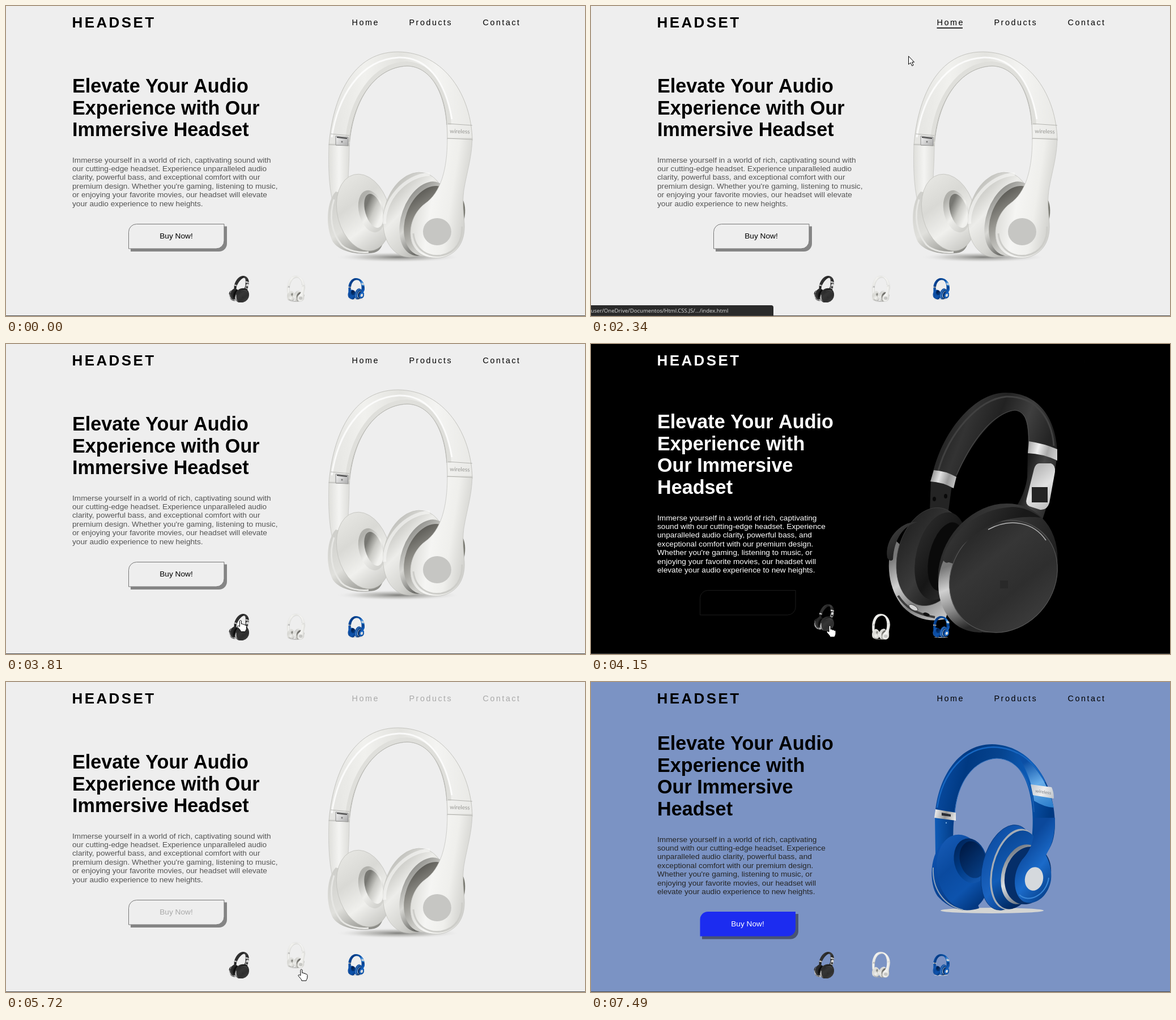
Animation of 1022 by 548 pixels, one loop 8150 ms. Source, as an HTML page with a canvas:

```html
<!DOCTYPE html>
<html lang="en">
<head>
<meta charset="utf-8">
<title>Headset</title>
<style>
html, body { margin: 0; width: 100%; height: 100%; overflow: hidden; background: #eee; }
canvas { display: block; }
</style>
</head>
<body>
<canvas id="stage" width="1022" height="548"></canvas>
<script>
const ctx = document.getElementById('stage').getContext('2d', { alpha: false });
const LOOP = 8150, SANS = '"Liberation Sans", Arial, sans-serif';
const clamp = v => Math.min(1, Math.max(0, v));
const mix = (a, b, k) => a + (b - a) * k;
const ease = k => k * k * (3 - 2 * k);
const blend = (a, b, k) => `rgb(${a.map((v, i) => Math.round(mix(v, b[i], k)))})`;

// ---------- drawing helpers ----------
function shape(d, fill, stroke, width = 1) {
  const path = new Path2D(d);
  if (fill) { ctx.fillStyle = fill; ctx.fill(path); }
  if (stroke) { ctx.strokeStyle = stroke; ctx.lineWidth = width; ctx.stroke(path); }
}
function oval(x, y, rx, ry, turn, fill, stroke, width = 1) {
  ctx.beginPath();
  ctx.ellipse(x, y, rx, ry, turn, 0, 7);
  if (fill) { ctx.fillStyle = fill; ctx.fill(); }
  if (stroke) { ctx.strokeStyle = stroke; ctx.lineWidth = width; ctx.stroke(); }
}
function shade(x0, y0, x1, y1, ...colors) {
  const g = ctx.createLinearGradient(x0, y0, x1, y1);
  colors.forEach((c, i) => g.addColorStop(i / (colors.length - 1), c));
  return g;
}
function text(str, x, y, font, color, spacing = 0, align = 'left') {
  ctx.font = font;
  ctx.letterSpacing = spacing + 'px';
  ctx.textAlign = align;
  ctx.fillStyle = color;
  ctx.fillText(str, x, y);
}
function bandLabel(x, y, turn, size, color) {
  ctx.save();
  ctx.translate(x, y);
  ctx.rotate(turn);
  text('wireless', 0, 0, size + 'px Lato, sans-serif', color, 0, 'center');
  ctx.restore();
}
function floorShadow(x, y, rx, ry) {
  ctx.save();
  ctx.translate(x, y);
  ctx.scale(1, ry / rx);
  const g = ctx.createRadialGradient(0, 0, 0, 0, 0, rx);
  g.addColorStop(0, 'rgba(90,90,86,.75)');
  g.addColorStop(.6, 'rgba(170,170,166,.45)');
  g.addColorStop(1, 'rgba(225,225,225,0)');
  oval(0, 0, rx, rx, 0, g);
  ctx.restore();
}

// ---------- headsets ----------
function whiteHeadset() {
  floorShadow(692, 444, 108, 9);
  // headband and left arm
  shape('M570 246C575 180 602 81 692 81C775 82 822 160 823 238L779 236C780 160 752 106 708 106C652 108 612 165 606 248Z',
    shade(570, 0, 823, 0, '#e4e4e1', '#f1f1ee', '#e3e3df', '#f4f4f2', '#e9e9e6'), '#c3c3be', 1);
  shape('M602 243C609 163 650 104 707 102C750 103 779 150 782 210', null, '#dfdfdb', 8);
  shape('M575 232C585 165 622 94 694 91C742 90 775 130 787 200', null, 'rgba(255,255,255,.8)', 3);
  shape('M606 240C613 165 652 108 708 106C748 107 775 150 778 210', null, '#b5b5b0', 1);
  shape('M570 244H606C606 275 604 295 604 310L577 348C569 315 569 280 570 244Z',
    shade(569, 0, 607, 0, '#dededa', '#f4f4f2', '#dcdcd8'), '#c6c6c2', .8);
  shape('M582 230L604 232V247L582 246Z', shade(582, 230, 604, 247, '#f4f4f4', '#aaa'), '#777', .8);
  shape('M584 232L602 234', null, '#444', 2);
  oval(593, 240, 1.5, 1.5, 0, '#777');
  shape('M570 245L606 247M573 226L606 229', null, '#a9a9a5', .8);
  // left cup
  shape('M582 328C566 345 563 390 577 417C590 436 625 441 650 436C672 430 670 395 660 350Z',
    shade(570, 340, 640, 440, '#cfcfcb', '#e0e0dc', '#8e8e89'));
  shape('M579 342C570 370 574 400 592 422C603 433 625 437 640 435', null, '#e6e6e3', 3);
  oval(631, 365, 46, 69, -.25, shade(590, 310, 672, 420, '#e6e6e2', '#d9d9d5', '#f0f0ed', '#c8c8c4'), '#bfbfba', .8);
  oval(645, 363, 22, 38, -.25, shade(625, 345, 668, 380, '#b0b0ab', '#efefec', '#d2d2ce'));
  oval(649, 362, 15, 31, -.28, shade(635, 355, 664, 368, '#777772', '#c9c9c4', '#f1f1ee'));
  // right cup
  oval(721, 369, 54, 76, .24, shade(670, 330, 765, 420, '#bfbfba', '#ededea', '#d6d6d2', '#aaaaa5'), '#c2c2bd', .8);
  shape('M668 385C666 345 702 300 748 297', null, 'rgba(250,250,248,.6)', 6);
  oval(740, 376, 42, 68, .34, shade(702, 340, 760, 400, '#8d8d89', '#d8d8d4', '#6f6f6b'));
  oval(748, 380, 43, 64, .34, shade(710, 335, 760, 410, '#55544f', '#96958f', '#d0d0cc'));
  // right arm flowing into the outer shell
  shape('M806 342C812 352 811 370 808 380Z', '#77776f');
  shape('M779 234C779 290 767 330 740 349C717 366 709 397 717 420C726 441 745 447 767 445C796 440 811 417 809 384C808 367 805 351 808 326C814 290 822 270 823 234Z',
    shade(718, 350, 815, 365, '#dcdcd8', '#f5f5f3', '#efefec', '#d0d0cc'), '#c4c4c0', .8);
  shape('M719 402C722 432 745 444 768 441C795 436 806 414 805 390', null, '#cdcdc9', 3);
  oval(761, 399, 25, 24, 0, '#c6c6c3');
  shape('M780 208L823 211M779 234L823 236', null, '#adada9', .9);
  bandLabel(801, 225, .03, 10, '#969692');
}

function blackHeadset() {
  // headband
  shape('M600 246C612 165 672 86 732 86C795 86 826 140 823 206L771 195C774 150 770 117 748 117C714 122 668 172 637 255Z',
    shade(620, 120, 800, 190, '#1c1c1c', '#333', '#222', '#3f3f3f', '#242424'));
  shape('M613 224C632 157 683 98 733 93C783 92 813 128 817 180', null, '#414141', 3);
  shape('M645 232C673 168 710 122 748 117C770 119 773 145 773 180', null, '#4a4a4a', 1.2);
  shape('M600 240L637 250L631 294L598 296Z', '#242424');
  oval(606, 274, 3, 4, 0, '#090909');
  oval(626, 269, 3, 4, 0, '#090909');
  shape('M605 223Q625 224 645 235L640 255Q620 244 599 243Z', shade(600, 230, 645, 245, '#8b8b8b', '#e1e1e1', '#999', '#c4c4c4'));
  // left cup
  shape('M535 345C518 385 525 435 551 465C573 488 602 492 626 486L640 440Z', shade(530, 380, 610, 488, '#777', '#d0d0d0', '#808080', '#c0c0c0'));
  shape('M542 445C555 465 572 477 607 483', null, '#3b3b3b', 4);
  oval(569, 466, 9, 4, .55, '#d5d5d5', '#444', 1);
  oval(592, 478, 6, 3, .3, '#111');
  oval(600, 376, 59, 88, .24, shade(545, 340, 655, 420, '#242424', '#3b3b3b', '#141414'), '#454545', .8);
  oval(617, 375, 43, 79, .24, shade(580, 350, 660, 400, '#262626', '#161616', '#303030'));
  oval(627, 376, 30, 62, .24, '#0a0a0a');
  shape('M523 378C517 345 548 312 576 315C551 321 535 345 533 381Q528 386 523 378Z', shade(520, 320, 560, 370, '#444', '#1b1b1b'));
  // right arm
  shape('M771 190L822 203C817 240 809 275 799 304L790 330L725 318C745 300 766 270 770 235Z',
    shade(760, 245, 816, 260, '#191919', '#444', '#292929'));
  shape('M773 172Q800 176 823 186V206Q798 194 771 193Z', shade(772, 180, 823, 195, '#aaa', '#eee', '#aaa', '#d0d0d0'));
  shape('M791 211H812Q820 214 819 226L809 281Q805 294 793 293L774 287Q766 283 769 273L782 221Q785 211 791 211Z',
    shade(775, 230, 815, 280, '#bbb', '#e2e2e2', '#c0c0c0'));
  ctx.fillStyle = '#242424';
  ctx.fillRect(778, 253, 28, 27);
  // right cup: shell, metal rim, face, fork
  oval(718, 396, 100, 119, .55, shade(622, 360, 800, 420, '#2c2c2c', '#383838', '#202020'));
  shape('M622 383C608 415 610 455 632 484C646 502 666 510 690 510L670 475L645 390Z', shade(612, 400, 655, 505, '#777', '#d0d0d0', '#888', '#292929'));
  oval(728, 411, 90, 104, .65, shade(660, 330, 790, 490, '#262626', '#363636', '#2e2e2e', '#3c3c3c'), '#555', 1.2);
  shape('M701 328C742 306 782 316 803 347', null, '#b8b8b8', 1.5);
  shape('M622 375C637 332 680 292 743 288C763 288 780 296 794 307C755 302 706 312 672 342C652 357 640 374 637 382C628 391 620 386 622 375Z',
    shade(640, 300, 730, 355, '#383838', '#191919'));
  ctx.fillStyle = '#292929';
  ctx.fillRect(722, 418, 14, 14);
}

function blueHeadset() {
  oval(708, 404, 91, 5, 0, '#d4d5d3');
  // headband
  shape('M607 240C610 175 645 110 708 110C775 111 818 175 819 250C819 275 813 294 800 306L776 290C786 240 780 135 716 135C675 137 643 178 641 245Z',
    shade(607, 150, 819, 200, '#0b4fa8', '#003982', '#06448f', '#0c5bb7', '#003982'));
  shape('M611 222C620 162 658 116 710 115C756 116 788 147 801 177', null, '#1767c2', 2.5);
  shape('M752 126C784 142 808 182 817 222Q802 222 782 210C779 180 770 158 752 126Z', shade(770, 140, 812, 218, '#0b4fa5', '#68aeea', '#2e7fcc'));
  shape('M642 236C645 175 678 137 716 135C757 136 780 180 782 230', null, '#2a6cbb', 1);
  shape('M607 238L641 241C638 262 641 275 637 288L608 305Z', shade(607, 0, 642, 0, '#0e5bb7', '#033b83'));
  shape('M608 225L644 231V245L606 240Z', shade(607, 230, 644, 242, '#eee', '#999', '#eee'));
  shape('M619 231L635 234V238L619 236Z', '#292d35');
  oval(627, 249, 1.2, 1.2, 0, '#7eb3e5');
  shape('M776 181L813 186Q817 194 817 206L780 200Z', shade(777, 185, 817, 204, '#c4cbd2', '#eee', '#bfc5cb'));
  bandLabel(798, 197, .15, 8, '#7d8288');
  // left cup
  shape('M620 285C595 310 597 365 615 382C634 402 661 408 685 400L665 330Z', shade(603, 310, 660, 400, '#0c50ac', '#063a83'));
  shape('M604 328C602 365 622 395 657 403', null, '#8da0b8', 2);
  oval(656, 336, 45, 67, -.2, shade(610, 290, 700, 390, '#1559b3', '#0a4a9f', '#0d53ad', '#003175'));
  oval(670, 316, 29, 40, -.22, shade(646, 290, 694, 335, '#00275f', '#003b86', '#1154aa'));
  oval(674, 314, 23, 33, -.22, shade(655, 295, 692, 330, '#001c49', '#063a7e'));
  // right cup
  oval(735, 328, 44, 77, .25, shade(690, 300, 778, 370, '#0d4ea4', '#1b64c1', '#003179'), '#043475', .8);
  oval(747, 331, 40, 73, .25, '#a6adb5');
  oval(750, 332, 40, 71, .25, shade(710, 290, 770, 380, '#0a4796', '#125db8', '#002962'));
  oval(761, 340, 36, 54, .28, shade(723, 310, 770, 390, '#777e87', '#dce0e3', '#596574'));
  oval(771, 342, 40, 52, .3, '#052e69');
  shape('M782 240C786 275 775 300 761 314C742 340 745 376 763 388C783 397 807 380 812 350C814 332 809 318 803 306C815 286 819 268 819 240Z',
    shade(750, 310, 816, 365, '#0b489b', '#1b6bca', '#07418c'));
  shape('M756 376C772 392 804 377 808 346', null, '#3b88d8', 2);
  oval(782, 348, 16, 21, .2, '#d5d9dd');
}

// ---------- page themes ----------
const WRAP = {
  wide: ['Elevate Your Audio|Experience with Our|Immersive Headset',
    "Immerse yourself in a world of rich, captivating sound with|our cutting-edge headset. Experience unparalleled audio|clarity, powerful bass, and exceptional comfort with our|premium design. Whether you're gaming, listening to music,|or enjoying your favorite movies, our headset will elevate|your audio experience to new heights."],
  narrow: ['Elevate Your Audio|Experience with|Our Immersive|Headset',
    "Immerse yourself in a world of rich, captivating|sound with our cutting-edge headset. Experience|unparalleled audio clarity, powerful bass, and|exceptional comfort with our premium design.|Whether you're gaming, listening to music, or|enjoying your favorite movies, our headset will|elevate your audio experience to new heights."]
};
const BLACK = [0, 0, 0], WHITE = [255, 255, 255], PALE = [238, 238, 238];
const light = { bg: '#eee', ink: BLACK, copy: '#555', wrap: 'wide', head: 153, body: 276.5, art: whiteHeadset,
  button: { x: 216, y: 385, fill: PALE, ink: BLACK, edge: '#777', shadow: '#858585' } };
const dark = { bg: '#000', ink: WHITE, copy: '#fff', wrap: 'narrow', head: 149, body: 311.5, art: blackHeadset,
  button: { x: 192, y: 435, fill: BLACK, ink: WHITE, edge: '#1c1c1c' } };
const blue = { bg: '#7b93c4', ink: BLACK, copy: '#252525', wrap: 'narrow', head: 120, body: 282.5, art: blueHeadset,
  button: { x: 192, y: 405.5, fill: [28, 44, 240], ink: WHITE, shadow: '#485473' } };
const SCENES = [[-999, light], [4150, dark], [5650, light], [6750, blue]];

const NAV = [['Home', 610.5, 46, 1880, 2330], ['Products', 711.5, 75, 1500, 1700], ['Contact', 841.5, 65, 1110, 1420]];
const THUMBS = [
  { art: blackHeadset, x: 394, y: 477, from: [525, 86], scale: [.117, .111], hover: [3800, 4640] },
  { art: whiteHeadset, x: 496, y: 477, from: [568, 81], scale: [.125, .124], hover: [4900, 5760] },
  { art: blueHeadset, x: 603.5, y: 481, from: [601, 110], scale: [.135, .128], hover: [6060, 6880] }
];
const BUTTON_HOVER = [2740, 3420];
const CLICKS = [[3010, 3095], [4080, 4150], [5580, 5650], [6650, 6740]];
const STATUS = [1370, 2480];
const TRACK = [[470, 965, 546], [850, 935, 290], [1110, 889, 38], [1300, 875, 34], [1500, 790, 32], [1700, 710, 31],
  [1880, 650, 33], [2130, 632, 34], [2270, 606, 48], [2340, 561, 88], [2550, 465, 240], [2740, 362, 386], [2970, 331, 402], [3310, 331, 402],
  [3420, 345, 432], [3800, 414, 488], [4000, 422, 498], [4560, 422, 498], [4640, 431, 500], [4900, 497, 507], [5180, 509, 508],
  [5650, 509, 508], [5760, 529, 508], [6060, 607, 506], [6300, 627, 502], [6780, 627, 502], [6880, 637, 503], [7090, 694, 511], [7460, 936, 546]];

const within = (t, [a, b]) => t >= a && t < b;
const hoverLevel = (t, [a, b], span) => ease(clamp((t - a) / span)) * (1 - ease(clamp((t - b) / span)));

function drawLines(lines, y, pitch, font, color) {
  lines.split('|').forEach((line, i) => text(line, 117, y + i * pitch, font, color));
}
function cutBox(x, y, w, h) {
  ctx.beginPath();
  ctx.roundRect(x, y, w, h, [14, 0, 14, 0]);
}
function drawButton(t, before, now, k) {
  const b = now.button, hover = hoverLevel(t, BUTTON_HOVER, 220);
  if (b.shadow) {
    cutBox(b.x + 4, b.y + 4.5, 170, 44.5);
    ctx.fillStyle = b.shadow;
    ctx.fill();
  }
  cutBox(b.x + .5, b.y + .5, 168.5, 43.5);
  ctx.fillStyle = blend(b.fill, BLACK, hover);
  ctx.fill();
  if (b.edge) {
    ctx.strokeStyle = b.edge;
    ctx.lineWidth = 1;
    ctx.stroke();
  }
  const ink = hover ? blend(b.ink, WHITE, hover) : blend(before.button.ink, b.ink, k);
  text('Buy Now!', b.x + 84.5, b.y + 26, '13.7px ' + SANS, ink, 0, 'center');
}
function drawThumb(t, { art, x, y, from, scale, hover }) {
  ctx.save();
  ctx.translate(x, y - 17 * hoverLevel(t, hover, 260));
  ctx.scale(...scale);
  ctx.translate(-from[0], -from[1]);
  art();
  ctx.restore();
}
function drawStatus() {
  ctx.beginPath();
  ctx.roundRect(-4, 529, 326, 18.5, [0, 4, 0, 0]);
  ctx.fillStyle = '#2a2a2a';
  ctx.fill();
  text('user/OneDrive/Documentos/Html.CSS.JS/.../index.html', 242.5, 542, '9.6px "Open Sans", sans-serif', '#ddd', 0, 'right');
}
function drawCursor(t) {
  if (t < TRACK[0][0] || t >= TRACK.at(-1)[0]) return;
  const i = TRACK.findIndex(p => p[0] > t), [t0, x0, y0] = TRACK[i - 1], [t1, x1, y1] = TRACK[i];
  const k = (t - t0) / (t1 - t0), x = mix(x0, x1, k), y = mix(y0, y1, k);
  if (CLICKS.some(c => within(t, c))) oval(x, y, 10.5, 10.5, 0, 'rgba(245,238,0,.56)');
  const overLink = NAV.some(([, left, width]) => y < 42 && x >= left && x < left + width);
  const zones = [BUTTON_HOVER, ...THUMBS.map(th => th.hover)];
  ctx.save();
  ctx.translate(x, y);
  ctx.lineJoin = 'round';
  if (overLink || zones.some(z => within(t, z)))
    shape('M-2 11V1.5C-2-.5 1-.5 1 1.5V6.5C2 5.5 4 6 4 7.5C5.5 6.5 7 7 7.2 8.5C9 8 10 9 10 10.5V14C10 17 8 18 8 20H0C0 17-5.5 13-6 11C-6 9.5-4 9-2 11Z', '#fff', '#000', 1);
  else
    shape('M0 0V14.5L3.5 11.5L6 17L8.5 16L6 10.5H10Z', '#fff', '#000', 1);
  ctx.restore();
}

function draw(t) {
  const n = SCENES.findLastIndex(s => t >= s[0]);
  const [since, now] = SCENES[n], before = SCENES[Math.max(0, n - 1)][1];
  const k = clamp((t - since) / 210), ink = `rgb(${now.ink})`;
  ctx.fillStyle = now.bg;
  ctx.fillRect(0, 0, 1022, 548);

  text('HEADSET', 116.5, 38, 'bold 26px ' + SANS, ink, 3.4);
  for (const [label, x, width, ...hover] of NAV) {
    text(label, x, 33.5, '14.4px ' + SANS, blend(before.ink, now.ink, k), 2.5);
    ctx.fillRect(x, 38, width * hoverLevel(t, hover, 180), 1.6);
  }
  const [heading, copy] = WRAP[now.wrap];
  drawLines(heading, now.head, 38.6, 'bold 34.2px ' + SANS, ink);
  drawLines(copy, now.body, 15.42, '13.7px ' + SANS, now.copy);
  drawButton(t, before, now, k);
  now.art();
  THUMBS.forEach(thumb => drawThumb(t, thumb));
  ctx.fillStyle = '#4a4a4a';
  ctx.fillRect(0, 547, 1022, 1);
  if (within(t, STATUS)) drawStatus();
  drawCursor(t);
}

const start = performance.now();
function tick() {
  draw((performance.now() - start) % LOOP);
  requestAnimationFrame(tick);
}
tick();
</script>
</body>
</html>
```
